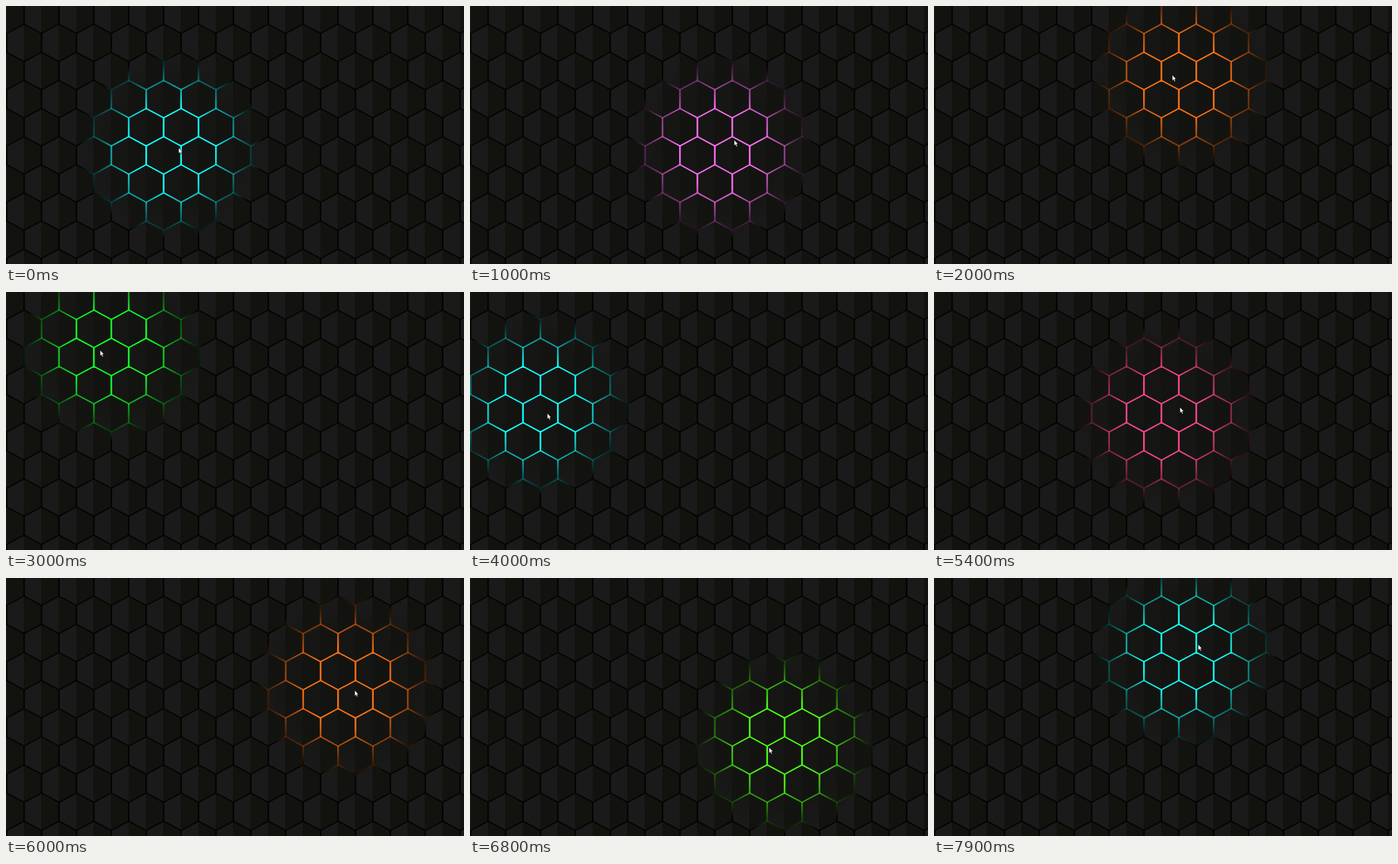
Recreate the animation shown at these times as an HTML page. Size 690 px wide and 388 px high, loop 8000 ms.

```html
<!DOCTYPE html>
<html lang="en">
<head>
<meta charset="utf-8">
<title>Hexagon glow</title>
<style>
  html, body { margin: 0; width: 100%; height: 100%; overflow: hidden; background: #030303; }
  svg { display: block; width: 690px; height: 388px; }
</style>
</head>
<body>
<svg viewBox="0 0 690 388">
  <defs>
    <radialGradient id="glow" gradientUnits="userSpaceOnUse" cx="0" cy="0" r="138">
      <stop offset=".45"/>
      <stop offset=".7" stop-opacity=".55"/>
      <stop offset="1" stop-opacity="0"/>
    </radialGradient>
    <radialGradient id="shade">
      <stop offset=".65" stop-color="#131411" stop-opacity=".65"/>
      <stop offset="1" stop-color="#131411" stop-opacity="0"/>
    </radialGradient>
  </defs>
  <path id="left" fill="#1a1a1a"/>
  <path id="right" fill="#12130f"/>
  <circle id="dim" r="138" fill="url(#shade)"/>
  <g fill="none" stroke="#030303">
    <path class="upright" stroke-width="2.2"/>
    <path class="slanted" stroke-width="1.8"/>
  </g>
  <g fill="none" stroke="url(#glow)">
    <path class="upright" stroke-width="2.5"/>
    <path class="slanted" stroke-width="2"/>
  </g>
  <path id="cursor" fill="#fff" stroke="#000" stroke-width=".5" d="M0 0V8.6L1.9 6.9L3.3 10L4.7 9.4L3.4 6.3H5.9Z"/>
</svg>
<script>
const LOOP = 8000, STEP = 100, LEAD = 90, CYCLE = 4000;
const HEX_W = 52.55, ROW_H = 42.3, SIDE = ROW_H / 3;
const $ = id => document.getElementById(id);

// Turning points of the glow; the pointer runs slightly ahead on the same path.
const route = [
  { t: 0, x: 249, y: 212 }, { t: 900, x: 361, y: 220 },
  { t: 1350, x: 436, y: 165 }, { t: 2000, x: 375, y: 107 },
  { t: 3300, x: 108, y: 92 }, { t: 4000, x: 104, y: 168 },
  { t: 4500, x: 220, y: 256 }, { t: 4800, x: 290, y: 251 },
  { t: 5400, x: 350, y: 186 }, { t: 5700, x: 436, y: 147 },
  { t: 6000, x: 514, y: 163 }, { t: 6300, x: 530, y: 186 },
  { t: 6800, x: 473, y: 247 }, { t: 7200, x: 352, y: 262 },
  { t: 7500, x: 298, y: 190 }, { t: 8000, x: 400, y: 98 }
];

function slope(i, axis) {
  const a = route[Math.max(0, i - 1)], b = route[Math.min(route.length - 1, i + 1)];
  return (b[axis] - a[axis]) / (b.t - a.t);
}

// Smooth curve through the turning points
function position(t) {
  const i = Math.max(0, Math.min(route.length - 2, route.findIndex(p => p.t > t) - 1));
  const a = route[i], b = route[i + 1], span = b.t - a.t;
  const u = (t - a.t) / span, v = 1 - u;
  return ['x', 'y'].map(axis =>
    a[axis] * v * v * (1 + 2 * u) + b[axis] * u * u * (3 - 2 * u) +
    span * u * v * (v * slope(i, axis) - u * slope(i + 1, axis)));
}

// Once round the wheel from cyan, running ahead midway, paler near magenta
function colour(t) {
  const p = t % CYCLE / CYCLE;
  const hue = 180 + 360 * p + 37 * Math.sin(Math.PI * p) + 13 * Math.sin(3 * Math.PI * p);
  const pale = Math.max(0, Math.cos((hue - 295) * Math.PI / 180)) ** 2;
  return `hsl(${hue % 360}, 100%, ${54 + 18 * pale}%)`;
}

function buildGrid() {
  let left = '', right = '', upright = '', slanted = '';
  for (let row = -1; row < 10; row++) {
    const y = 13.1 + row * ROW_H, top = y - SIDE, bottom = y + SIDE;
    for (let col = -1; col < 14; col++) {
      const x = 1 + (col + (row % 2 ? 0 : .5)) * HEX_W;
      const mid = x + HEX_W / 2, end = x + HEX_W;
      const halfHex = side => `M${mid} ${top - SIDE}L${side} ${top}V${bottom}L${mid} ${bottom + SIDE}Z`;
      left += halfHex(x);
      right += halfHex(end);
      upright += `M${x} ${top}V${bottom}`;
      slanted += `M${x} ${top}L${mid} ${top - SIDE}L${end} ${top}`;
    }
  }
  const setPath = (selector, d) =>
    document.querySelectorAll(selector).forEach(p => p.setAttribute('d', d));
  setPath('#left', left);
  setPath('#right', right);
  setPath('.upright', upright);
  setPath('.slanted', slanted);
}

const stops = document.querySelectorAll('#glow stop');

function draw(t) {
  const place = ([x, y]) => `translate(${x} ${y})`;
  const centre = place(position(t));
  $('glow').setAttribute('gradientTransform', centre);
  $('dim').setAttribute('transform', centre);
  $('cursor').setAttribute('transform', place(position(t + LEAD)));
  const tint = colour(t);
  stops.forEach(s => s.setAttribute('stop-color', tint));
}

buildGrid();
const begin = performance.now();
function tick() {
  const t = (performance.now() - begin) % LOOP;
  draw(Math.floor(t / STEP) * STEP);
  requestAnimationFrame(tick);
}
tick();
</script>
</body>
</html>
```
